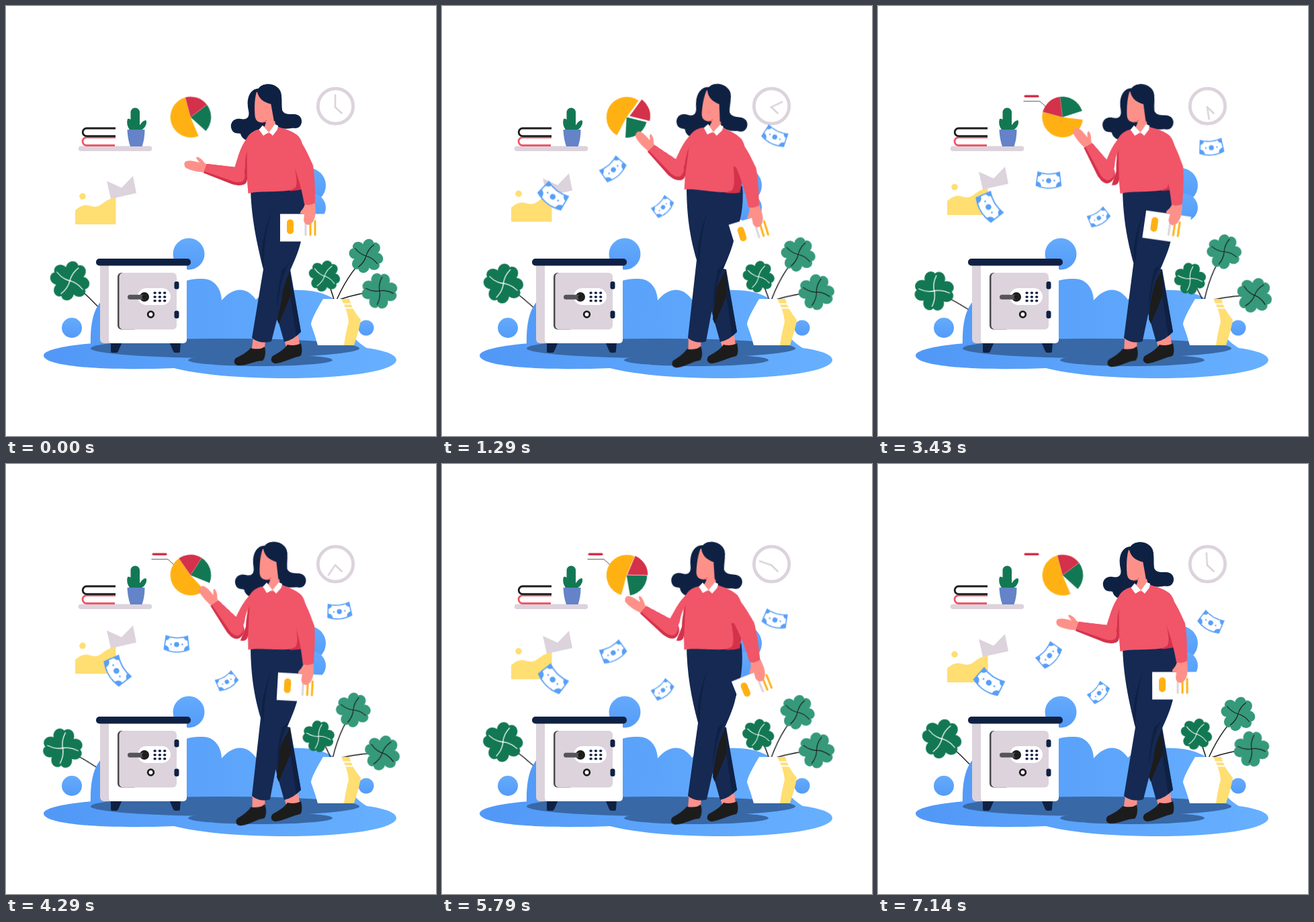
These frames come from a looping animation (640x640 px, 7.21 s). An HTML page without scripts:

```html
<!DOCTYPE html>
<html lang="en">
<head>
<meta charset="utf-8">
<title>Savings</title>
<style>
html, body { margin: 0; width: 100%; height: 100%; overflow: hidden; background: #fff; }
svg { display: block; width: 100%; height: 100%; }

.navy { fill: #0f2143; }
.pants { fill: #152953; }
.skin { fill: #fd918a; }
.red { fill: #f05568; }
.wine { fill: #d4314a; }
.lilac { fill: #dcd3dc; }
.amber { fill: #ffb114; }
.sand { fill: #ffde72; }
.green { fill: #127853; }
.ink { fill: #1c1c1c; }
.white { fill: #fff; }
.line { fill: none; stroke: #1c1c1c; stroke-width: 1.5; stroke-linecap: round; }

/* one loop lasts 7.21s */
.spin, .pie, .pop, .rule, .bar, .fall, .bill, .torso, .head, .upper, .fore, .palm, .arm, .grip, .leg, .foot {
  animation: 7.21s cubic-bezier(.37,0,.63,1) infinite;
}
.sway, .rise { animation: sway 3.605s cubic-bezier(.37,0,.63,1) infinite alternate; }
.rise { animation-name: rise; }
@keyframes sway { to { transform: rotate(var(--r)); } }
@keyframes rise { to { transform: translateY(-14px); } }

.spin { animation-name: spin; animation-timing-function: linear; transform-origin: 490px 150.5px; }
@keyframes spin { to { transform: rotate(360deg); } }

.pie { animation-name: pie; }
@keyframes pie {
  0%, 100% { transform: rotate(0deg); }
  17.9%, 29.7% { transform: rotate(51deg); }
  47.6% { transform: rotate(-60deg); animation-timing-function: ease-in; }
  59.5% { transform: rotate(-20deg); animation-timing-function: ease-out; }
  80.3% { transform: rotate(38deg); }
}
.pop { animation-name: pop; }
@keyframes pop {
  0%, 9%, 28%, 68%, 92%, 100% { transform: none; }
  17.9% { transform: translate(1.6px, -4.7px); }
  80.3% { transform: translate(.4px, -1.1px); }
}

.rule { animation-name: rule; stroke-dasharray: 1 2; }
@keyframes rule {
  0%, 24.5% { stroke-dashoffset: 1; }
  30.4%, 91% { stroke-dashoffset: 0; }
  96%, 100% { stroke-dashoffset: 1; }
}
.bar { animation-name: bar; }
@keyframes bar { 0%, 28.3% { opacity: 0; } 33.6%, 100% { opacity: 1; } }

.fall { animation-name: fall; }
@keyframes fall {
  0%, 6% { opacity: 0; }
  7% { transform: none; }
  10% { opacity: 1; }
  100% { opacity: 1; transform: translateY(43px); }
}
.bill { animation-name: bill; }
@keyframes bill {
  0%, 7%, 100% { transform: rotate(var(--a)) scale(var(--s)); }
  54% { transform: rotate(var(--b)) scale(var(--s)); }
}

.torso { animation-name: torso; transform-origin: 402px 277px; }
@keyframes torso {
  0%, 100% { transform: rotate(0deg); }
  17.9% { transform: rotate(8deg); animation-timing-function: ease-in; }
  29.7% { transform: rotate(5.1deg); animation-timing-function: ease-out; }
  47.6% { transform: rotate(-.5deg); animation-timing-function: ease-in; }
  59.5% { transform: rotate(3.5deg); animation-timing-function: ease-out; }
  70% { transform: rotate(5deg); animation-timing-function: ease-in; }
  80.3% { transform: rotate(3.5deg); animation-timing-function: ease-out; }
}
.head { animation-name: head; transform-origin: 392px 182px; }
@keyframes head {
  0%, 29.7%, 59.5%, 100% { transform: rotate(0deg); }
  47.6%, 80.3% { transform: rotate(3deg); }
}
.upper { animation-name: upper; transform-origin: 366px 205px; }
@keyframes upper {
  0%, 17.9%, 100% { transform: rotate(0deg); }
  29.7%, 80.3% { transform: rotate(8deg); }
  47.6%, 59.5% { transform: rotate(6deg); }
}
.fore { animation-name: fore; transform-origin: 349px 253px; }
@keyframes fore {
  0%, 100% { transform: rotate(0deg); }
  17.9% { transform: rotate(19deg); }
  29.7% { transform: rotate(14deg); }
  47.6% { transform: rotate(37deg); animation-timing-function: ease-in; }
  59.5% { transform: rotate(27deg); animation-timing-function: linear; }
  80.3% { transform: rotate(10deg); animation-timing-function: ease-out; }
}
.palm { animation-name: palm; transform-origin: 297px 242px; }
@keyframes palm {
  0%, 29.7%, 59.5%, 100% { transform: rotate(0deg); }
  17.9% { transform: rotate(8deg); }
  47.6% { transform: rotate(-4deg); }
}
.arm { animation-name: arm; transform-origin: 430px 205px; }
@keyframes arm {
  0%, 100% { transform: rotate(0deg); }
  17.9% { transform: rotate(-9.4deg); animation-timing-function: ease-in; }
  29.7% { transform: rotate(-5.5deg); animation-timing-function: ease-out; }
  47.6% { transform: rotate(4.6deg); animation-timing-function: ease-in; }
  59.5% { transform: rotate(.7deg); animation-timing-function: ease-out; }
  80.3% { transform: rotate(-9.5deg); }
}
.grip { animation-name: grip; transform-origin: 452px 293px; }
@keyframes grip {
  0%, 100% { transform: rotate(0deg); }
  17.9% { transform: rotate(-15.6deg); animation-timing-function: ease-in; }
  29.7% { transform: rotate(-7.8deg); animation-timing-function: ease-out; }
  47.6% { transform: rotate(4deg); animation-timing-function: ease-in; }
  59.5% { transform: rotate(-1deg); animation-timing-function: ease-out; }
  80.3% { transform: rotate(-16deg); }
}
.leg { animation-name: leg; }
@keyframes leg {
  0%, 29.7%, 100% { d: path("M364 266C364 312 374 356 383 392L366 494C374 501 386 502 395 499L410 440C413 402 434 380 440 345C445 325 449 300 444 266Z"); }
  17.9%, 59.5% { d: path("M364 266C364 312 369 344 379 378L366 494C374 501 386 502 393 499L404 440C413 396 427 378 434 350C443 325 450 300 447 268Z"); }
}
.foot { animation-name: foot; transform-origin: 378px 505px; }
@keyframes foot {
  0%, 29.7%, 100% { transform: rotate(0deg); }
  17.9%, 59.5% { transform: rotate(-6deg); }
}
</style>
</head>
<body>
<svg viewBox="0 0 640 640">
<defs>
  <linearGradient id="sky" gradientUnits="userSpaceOnUse" x1="80" y1="0" x2="580" y2="0">
    <stop offset="0" stop-color="#5299f7"/><stop offset="1" stop-color="#67b0ff"/>
  </linearGradient>
  <linearGradient id="mist" x1="0" y1="0" x2="0" y2="1">
    <stop offset="0" stop-color="#64abfd"/><stop offset="1" stop-color="#549bf8"/>
  </linearGradient>
  <path id="leaf" d="M0 0C-5 -5 -15 -9 -15.500 -18C-15.500 -28 -5 -32 0 -26C5 -32 15.500 -28 15.500 -18C15 -9 5 -5 0 0Z"/>
  <g id="clover">
    <use href="#leaf"/><use href="#leaf" transform="rotate(90)"/>
    <use href="#leaf" transform="rotate(180)"/><use href="#leaf" transform="rotate(270)"/>
    <path d="M2 -23Q-3 -11 0 0T-2 23M-23 -2Q-11 3 0 0T23 2" fill="none" stroke="var(--vein)" stroke-width="1.300" stroke-linecap="round"/>
  </g>
  <path id="note" d="M-16 -11Q0 -5 16 -11L18.500 9Q0 17 -18.500 9Z"/>
  <clipPath id="noteClip"><use href="#note"/></clipPath>
  <g id="bill" fill="#589ff8">
    <use href="#note" fill="#fff"/>
    <g clip-path="url(#noteClip)">
      <circle cx="-17" cy="-11" r="7"/><circle cx="17" cy="-11" r="7"/>
      <circle cx="-18" cy="10" r="7"/><circle cx="18" cy="10" r="7"/>
    </g>
    <use href="#note" fill="none" stroke="#589ff8" stroke-width="1.600"/>
    <circle cy="1.700" r="3.800"/><circle cx="-8.500" cy="1.500" r="1.200"/><circle cx="8.500" cy="1.500" r="1.200"/>
  </g>
</defs>

<!-- left plant -->
<g class="sway" style="--r:-14.300deg;--vein:#fff;transform-origin:150px 462px">
  <path class="line" d="M95 409Q125 433 150 462"/>
  <g transform="translate(95 409)"><g class="sway green" style="--r:-12deg"><use href="#clover" transform="rotate(29)"/></g></g>
</g>

<!-- landscape -->
<g fill="url(#sky)">
  <path d="M126 510C125 470 130 445 152 430L240 425C262 408 274 406 293 406C308 406 320 418 321 438C338 418 358 417 372 437C385 424 410 422 440 423C470 424 497 434 505 458C510 490 520 498 538 510L540 530H130Z"/>
  <path d="M56 520C58 506 140 498 240 498H420C470 498 510 502 537 509C565 513 581 519 581 527C580 544 500 554 420 554C350 554 290 549 250 539C150 543 56 537 56 520Z"/>
</g>
<g fill="url(#mist)">
  <circle cx="272" cy="369" r="23.500"/><circle cx="98" cy="479" r="15"/><circle cx="536" cy="479" r="11.500"/>
  <circle cx="450" cy="267" r="26"/><circle cx="455" cy="300" r="21"/>
</g>
<g fill="#3868a6">
  <ellipse cx="326" cy="509.500" rx="200" ry="14.500"/><ellipse cx="378.500" cy="527" rx="107.500" ry="9"/>
</g>

<!-- vase -->
<g style="transform-origin:495px 470px;--r:-11.800deg;--vein:#1c1c1c" class="sway">
  <path class="line" d="M536 372Q506 402 489 445"/>
  <g transform="translate(536 372)" fill="#35997a"><use href="#clover" transform="rotate(30) scale(.87)"/></g>
</g>
<g style="transform-origin:495px 470px;--r:6deg;--vein:#1c1c1c" class="sway">
  <path class="line" d="M556 424Q525 427 496 437"/>
  <g transform="translate(556 424)" fill="#35997a"><g class="sway" style="--r:25deg"><use href="#clover" transform="rotate(5) scale(.9)"/></g></g>
</g>
<g style="transform-origin:495px 470px;--r:-8.300deg;--vein:#fff" class="sway">
  <path class="line" d="M474 402Q484 418 490 445"/>
  <g transform="translate(474 402)"><g class="sway green" style="--r:-15deg"><use href="#clover" transform="rotate(32) scale(.8)"/></g></g>
</g>
<path class="white" d="M472 436H502L514 470L504 505H464Q460 490 454 474Q454 466 472 436Z"/>
<path class="sand" d="M499 436H511Q515 452 528 467Q527 477 518 505H503Q506 485 510 470Q509 455 499 436Z"/>
<path d="M501 443.500H516M503 449.500H518" stroke="#fff" stroke-width="1.800"/>

<!-- safe -->
<path class="navy" d="M156 500H173L167 514Q166 516 164 516H158Q156 516 156 513ZM243 500H260L259 513Q259 516 257 516H252Q250 516 249 514Z"/>
<rect class="lilac" x="140" y="380" width="40" height="122" rx="6"/>
<rect class="white" x="153" y="380" width="116" height="122" rx="5"/>
<rect class="navy" x="134" y="376" width="141" height="10.500" rx="5"/>
<rect x="166" y="397" width="30" height="84.500" rx="6" fill="#4a484c"/>
<rect class="lilac" x="168.500" y="397" width="85.500" height="84.500" rx="6"/>
<rect class="navy" x="250.500" y="410" width="7" height="11.500" rx="3"/>
<rect class="navy" x="250.500" y="453.500" width="7" height="11.500" rx="3"/>
<rect class="white" x="196" y="420" width="49" height="25" rx="12.500"/>
<path d="M221.200 427h.8m6.500 0h.8m6.500 0h.8M221.200 433h.8m6.500 0h.8m6.500 0h.8M221.200 438.800h.8m6.500 0h.8m6.500 0h.8" stroke="#0f2143" stroke-width="3.600" stroke-linecap="round"/>
<circle class="ink" cx="206" cy="433" r="7"/>
<path d="M184.500 433.300H206" stroke="#56535a" stroke-width="7" stroke-linecap="round"/>
<circle class="ink" cx="206" cy="433.300" r="3.500"/>
<circle cx="215.500" cy="459" r="4.300" fill="#fff" stroke="#1c1c1c" stroke-width="2.800"/>

<!-- shelf -->
<path d="M111.500 212.300H213.500" stroke="#dcd3dc" stroke-width="7.500" stroke-linecap="round"/>
<g fill="none" stroke-width="2.800">
  <path d="M163 195.500H120a6 6 0 0 0 0 12H162" stroke="#f05568"/>
  <path d="M163 182H120a5.800 5.800 0 0 0 0 11.600H163" stroke="#1c1c1c"/>
</g>
<g class="green">
  <rect x="185.500" y="151.500" width="13.500" height="36" rx="6.700"/>
  <path d="M181 168Q186 166 189 175L191 186H185Q178 176 181 168ZM208.500 170Q211 176 204 183L198 186L196 183Q202 170 208.500 170Z"/>
</g>
<path fill="#6483c8" d="M180.500 184H206.500Q206.500 198 202.500 209H185Q181 198 180.500 184Z"/>

<!-- clock -->
<circle cx="490.500" cy="149" r="26.200" fill="none" stroke="#dcd3dc" stroke-width="4.800"/>
<g stroke="#dcd3dc" stroke-width="2.600" stroke-linecap="round">
  <path d="M490 150.500L499.500 159.500"/><path class="spin" d="M490 150.500V132.500"/>
</g>

<!-- chart and letter -->
<g class="rise">
  <circle class="sand" cx="114" cy="283.300" r="4.800"/>
  <path class="sand" d="M103 304C112 296 119 295 127 298C143 302 143 288 163.500 285V325H103Z"/>
  <path class="white" d="M150 261L188 253L172 271Z"/>
  <path class="lilac" d="M150 260.500L172 270.500L189 253L194 278.500L156 287Z"/>
</g>

<!-- pie -->
<path class="rule" pathLength="1" d="M250 150L241 141.800H216.500" fill="none" stroke="#555" stroke-width="1"/>
<path class="bar" d="M219.300 134.300H237.800" stroke="#d4314a" stroke-width="3.500" stroke-linecap="round"/>
<g transform="translate(274.700 165.500)">
  <g class="pie">
    <path class="amber" d="M0 0L11.900 28.100A30.500 30.500 0 1 1 -7.900 -29.500Z"/>
    <path class="green" d="M0 0L24.400 -18.400A30.500 30.500 0 0 1 22.700 20.400Z"/>
    <path class="wine pop" d="M0 0L-7.900 -29.500A30.500 30.500 0 0 1 24.400 -18.400Z"/>
  </g>
</g>

<!-- legs -->
<path class="skin" d="M414 496L435 490L437 505L417 508Z"/>
<path class="ink" d="M419 504C426 506 433 505 439 502C441 510 441 518 438 521C425 524 412 531 402 532C394 532 393 525 397 521C406 516 414 511 419 504Z"/>
<path class="pants" d="M392 385L423 392L439 485Q428 497 414 500L400 450Z"/>
<path class="navy" d="M422 392L439 485L432 491Q424 440 420 405Z"/>
<path class="ink" d="M422 394L424 430L406 473L403 466L408 420Z"/>
<g class="foot">
  <path class="skin" d="M368 493L386 497L385 510L366 510Z"/>
  <path class="ink" d="M364 509C372 512 380 511 385 507C387 515 386 524 382 528C370 528 360 535 347 535C339 535 338 528 342 524C352 519 359 515 364 509Z"/>
</g>
<path class="pants leg" d="M364 266C364 312 374 356 383 392L366 494C374 501 386 502 395 499L410 440C413 402 434 380 440 345C445 325 449 300 444 266Z"/>
<path class="navy" d="M396 304Q385 335 383 388Q379 370 382 352Q387 325 396 304ZM424 378Q418 388 411 392Q404 420 403 450L406 432Q410 400 424 378Z"/>

<!-- upper body -->
<g class="torso">
  <g class="head">
    <path class="navy" d="M376 123C362 123 357 140 361 156C363 166 358 170 349 168C338 166 332 176 336 184C339 191 346 189 349 190C351 198 360 204 368 197C378 188 392 180 402 178C412 186 424 181 430 182C440 182 443 170 437 164C430 157 416 166 411 155C409 145 413 130 405 122C396 115 382 114 376 123Z"/>
    <path class="skin" d="M373 128C369 140 370 160 371 166C373 174 381 174 387 173L384 182L392 192L402 180L395 146C386 144 377 140 374 128Z"/>
    <path d="M381 173.500Q386 173 388 170" fill="none" stroke="#d4314a" stroke-width="1"/>
    <path class="navy" d="M374 126C378 114 400 112 408 126C412 135 409 145 411 156L399 172L394 144C384 144 376 138 374 126Z"/>
  </g>
  <path class="red" d="M379 183C362 186 354 198 355 215L360.500 279C380 274 410 279 440 271L446 235C443 210 441 197 432 191C424 185 412 182 404 180L391 190Z"/>
  <path class="wine" d="M428 235C432 250 435 266 430 271L421 275Q432 276 443 272L446 235Z"/>
  <path class="wine" d="M358.500 212Q354 230 355 245L348 266Q358 268 359 258Z"/>
  <path class="skin" d="M384 179L391 189L399 178Z"/>
  <path class="white" d="M382 177.500L391 188L383 193L376.500 184ZM400 176L405 178L404 184L397 193L391.500 188Z"/>
  <g class="upper">
    <g class="fore">
      <path class="skin palm" d="M301 236L296 234C293 230 289 225 284 224.500C282 226 285 229 288 233C281 231 274 229 268 231C264 233 265 239 268 241C275 245 286 247 298 248Z"/>
      <path class="wine" d="M299 235L342 240C356 242 361 252 357 262C353 269 343 267 336 265L294 248.500Z"/>
      <path class="red" d="M299 235L342 240C354 242 358 250 354 259C351 263 344 263 338 261L295 246Z"/>
    </g>
    <path class="red" d="M378 186C358 190 352 206 346 222L340 241C340 252 347 258 353 255L356 240Q355 224 362 205Z"/>
  </g>
  <g class="arm">
    <g class="grip">
      <rect class="white" x="408" y="309.500" width="67.500" height="41"/>
      <rect class="amber" x="418" y="317.500" width="10" height="22" rx="5"/>
      <path d="M446 320V340.500" stroke="#dcd3dc" stroke-width="3" stroke-linecap="round"/>
      <path d="M453 320V340.500M460 320V340.500" stroke="#ffb114" stroke-width="3" stroke-linecap="round"/>
      <path class="skin" d="M446 291L459 290C462 305 461 314 457 321C452 328 445 327 443 319L444 309C438 311 436 308 440 304Q444 300 446 291Z"/>
    </g>
    <path class="red" d="M420 190C436 191 444 208 457 237C460 255 460 275 460 293Q452 298 444 295C441 278 437 260 428 237L412 205Z"/>
  </g>
</g>

<!-- money -->
<g class="fall">
  <g transform="translate(166 281)"><use class="bill" href="#bill" style="--a:34deg;--b:60deg;--s:1.140"/></g>
  <g transform="translate(254 241)"><use class="bill" href="#bill" style="--a:-48deg;--b:3deg;--s:1"/></g>
  <g transform="translate(328 297)"><use class="bill" href="#bill" style="--a:-46deg;--b:-30deg;--s:.850"/></g>
  <g transform="translate(496 192)"><use class="bill" href="#bill" style="--a:30deg;--b:-7deg;--s:.970"/></g>
</g>
</svg>
</body>
</html>
```
